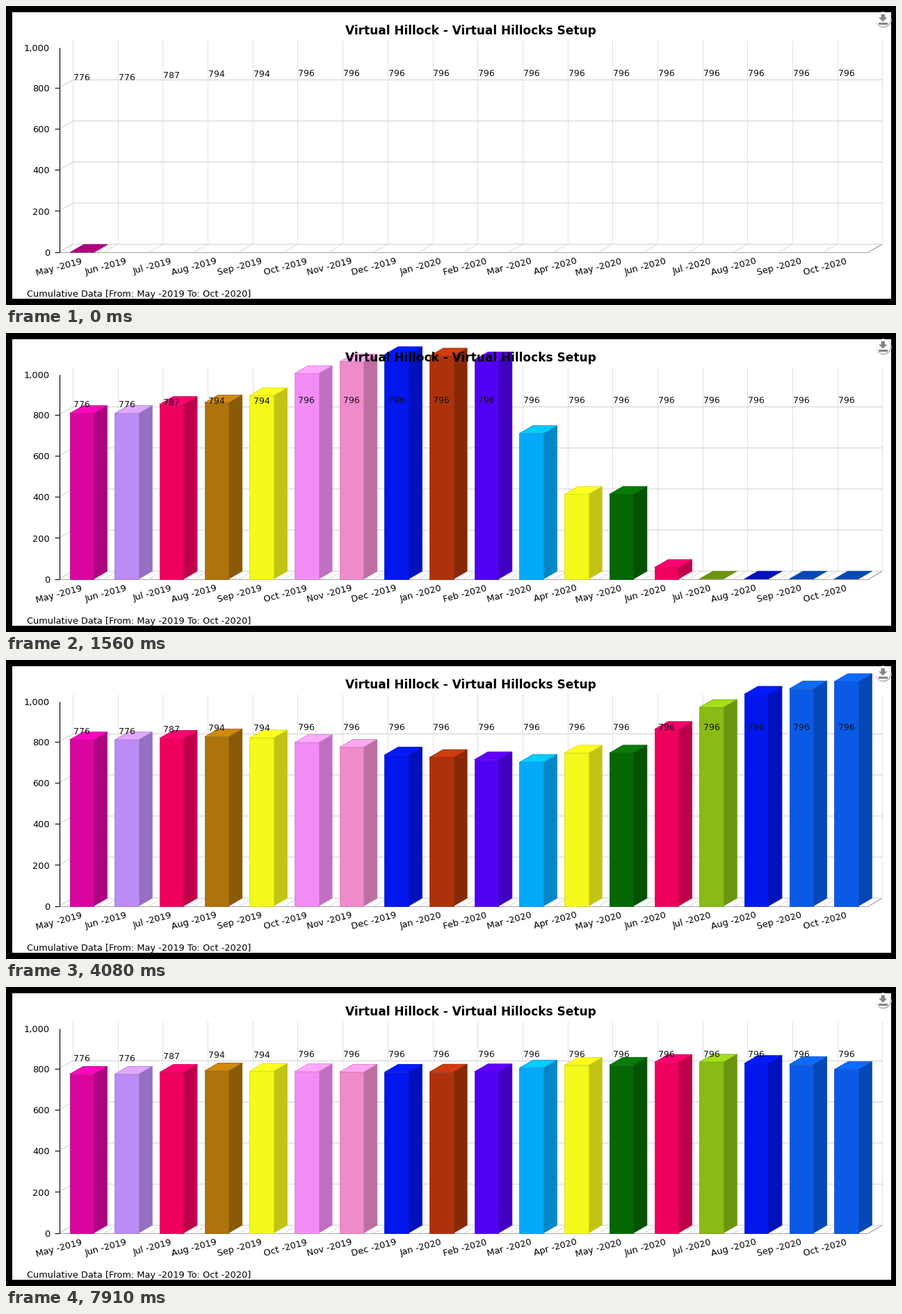
Animation, 1280 px wide and 431 px high, one loop 8 s. Source, as a matplotlib script:

```python
import numpy as np
import matplotlib.pyplot as plt
from matplotlib.animation import FuncAnimation
from matplotlib.collections import PolyCollection
from matplotlib.colors import to_rgb
from matplotlib.patches import Circle, Polygon, Rectangle

W, H, DPI = 1280, 431, 64
LOOP, TICK = 8000, 40
PT = 72 / DPI

# chart geometry in pixels
X0, BASE, SLOT = 76.5, 354.6, 64.69
BAR_W, DX, DY = 34.5, 19.5, -11.3
UNIT = 0.296

VALUES = [776, 776, 787, 794, 794] + [796] * 13
COLORS = ["#da059f", "#bc8cf5", "#f0005e", "#ae730c", "#f3f91a", "#f38df5",
          "#f08bcb", "#0216ee", "#ad320c", "#5200f4", "#04a9fa", "#f3f91a",
          "#046804", "#f0005e", "#88bb14", "#0216ee", "#0a5ae6", "#0a5ae6"]
# steps each bar lags behind the first one
LAGS = [0, 0, 1, 1, 2, 5, 7, 10, 11, 12, 18, 21, 21, 25, 28, 30, 31, 34]
MONTHS = "Jan Feb Mar Apr May Jun Jul Aug Sep Oct Nov Dec".split()

# bursts of redraws: first time, last time, count
BURSTS = [(230, 990, 15), (1040, 1760, 12), (1860, 2170, 5), (2270, 2750, 6),
          (2930, 3160, 3), (3290, 3540, 3), (3720, 4180, 5), (4330, 5120, 8),
          (5200, 5200, 1), (5370, 5450, 2), (5620, 5720, 2), (5870, 5920, 2),
          (6120, 6220, 2), (6490, 6780, 4), (6960, 7040, 2), (7210, 7340, 2),
          (7540, 7660, 2), (7910, 7910, 1)]
STEPS = np.concatenate([np.linspace(*b) for b in BURSTS])

plt.rcParams["font.family"] = "DejaVu Sans"
fig = plt.figure(figsize=(W / DPI, H / DPI), dpi=DPI, facecolor="black")
ax = fig.add_axes([0, 0, 1, 1])
ax.set_xlim(0, W)
ax.set_ylim(H, 0)
ax.axis("off")


def line(xs, ys, color, width=1.0, z=1):
    ax.plot(xs, ys, color=color, lw=width * PT, zorder=z,
            solid_capstyle="butt", solid_joinstyle="miter")


def label(x, y, text, px, **kw):
    ax.text(x, y, text, fontsize=px * PT, zorder=5, **kw)


def shade(color, k):
    return tuple(min(1, c * k) for c in to_rgb(color))


def draw_grid():
    grid = "#dadada"
    for i in range(19):
        x = X0 + SLOT * i
        edge = "#8c8c8c" if i == 18 else grid
        line([x, x + DX], [BASE, BASE + DY], edge)
        line([x + DX] * 2, [BASE + DY, 49], "#e2e2e2")
    for k in range(5):
        y = BASE - 200 * UNIT * k
        line([X0, X0 + DX, X0 + DX + 18 * SLOT], [y, y + DY, y + DY], "#cfcfcf")
        line([70, X0], [y, y], "#111111", 1.2)
    line([X0, X0 + 18 * SLOT], [BASE, BASE], "#a4a4a4")
    line([X0, X0], [60, BASE + 0.5], "#111111", 1.3)


def draw_labels():
    for k in range(6):
        y = max(BASE - 200 * UNIT * k, 59.3)
        label(63, y + 5.2, f"{200 * k:,}", 12.9, ha="right", va="baseline")
    for i, v in enumerate(VALUES):
        m = i + 4
        label(110 + SLOT * i, 371, f"{MONTHS[m % 12]} -{2019 + m // 12}", 12.9,
              ha="right", va="baseline", rotation=15, rotation_mode="anchor")
        label(X0 + SLOT * (i + 0.5), BASE - v * UNIT - 17.7, str(v), 12.5,
              ha="center", va="baseline", color="#111111")
    label(668.5, 41.2, "Virtual Hillock - Virtual Hillocks Setup", 17,
          ha="center", va="baseline", weight="bold")
    label(30.5, 418.8, "Cumulative Data [From: May -2019 To: Oct -2020]", 12.9,
          ha="left", va="baseline")


def draw_button():
    for r, g in ((11.6, 0.93), (11, 0.82), (10.3, 0.7)):
        ax.add_patch(Circle((1262, 20.5), r, fc=str(g), ec="none", zorder=1.5))
    ax.add_patch(Circle((1261.3, 19), 10.6, fc="white", ec="none", zorder=1.6))
    arrow = [(1258.5, 12), (1264, 12), (1264, 16.5), (1267.5, 16.5),
             (1261.2, 22.5), (1255, 16.5), (1258.5, 16.5)]
    ax.add_patch(Polygon(arrow, fc="#868686", ec="none", zorder=1.7))
    ax.add_patch(Rectangle((1255, 24), 12.5, 2.6, fc="#868686", ec="none", zorder=1.7))


def elastic(n):
    """Elastic ease-out, 120 steps long."""
    return 1 - 2 ** (-n / 12) * np.cos(np.radians(10 * n))


def bar_faces(i, n):
    x, side = X0 + SLOT * i + (SLOT - BAR_W) / 2, shade(COLORS[i], 0.79)
    r = x + BAR_W
    y = BASE - VALUES[i] * UNIT * elastic(n) if n > 0 else BASE
    top = [(x, y), (x + DX, y + DY), (r + DX, y + DY), (r, y)]
    if n <= 0:
        return [(top, side, side)]
    front = [(x, y), (r, y), (r, BASE), (x, BASE)]
    flank = [(r, y), (r + DX, y + DY), (r + DX, BASE + DY), (r, BASE)]
    rim = shade(COLORS[i], 0.88)
    return [(flank, side, side), (front, COLORS[i], rim),
            (top, shade(COLORS[i], 1.2), rim)]


ax.add_patch(Rectangle((8.5, 9), 1264, 413, fc="white", ec="none", zorder=0))
draw_grid()
draw_labels()
draw_button()
bars = PolyCollection([], linewidths=0.8 * PT, zorder=3)
ax.add_collection(bars, autolim=False)


def update(k):
    t = k * TICK + 30
    n = np.count_nonzero(STEPS <= t + 0.5)
    if n:
        n += 2
    faces = []
    for i, lag in enumerate(LAGS):
        if n > lag or t >= 85 * i - 35:
            faces += bar_faces(i, n - lag)
    verts, fills, edges = zip(*faces)
    bars.set_verts(verts)
    bars.set_facecolor(fills)
    bars.set_edgecolor(edges)
    return [bars]


anim = FuncAnimation(fig, update, frames=LOOP // TICK, interval=TICK,
                     repeat=True, repeat_delay=0, blit=False)
plt.show()
```
